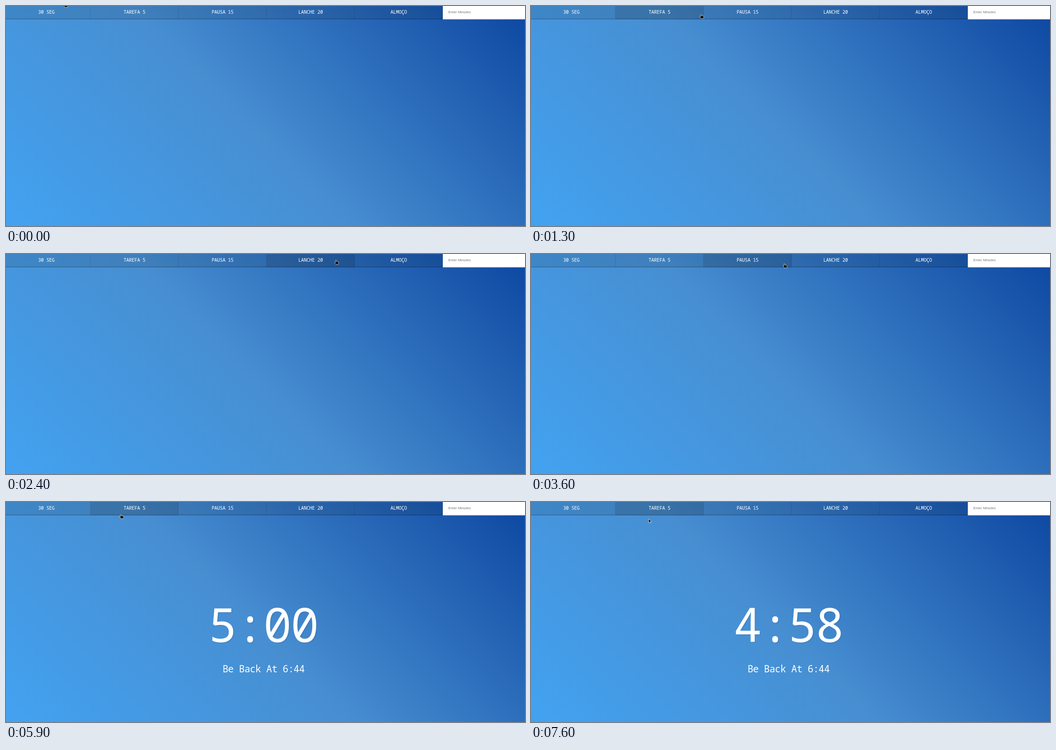
These frames come from a looping animation (1149 by 487 pixels, 8 s). An HTML page:

```html
<!DOCTYPE html>
<html lang="pt">
<head>
<meta charset="utf-8">
<title>Countdown timer</title>
<style>
html, body { margin: 0; width: 100%; height: 100%; overflow: hidden; }
svg {
  display: block; width: 1149px; height: 487px;
  background: linear-gradient(45deg, #42a5f5 0%, #478ed1 50%, #0d47a1 100%) -8px 0 / 1157px 583px no-repeat;
}
text { fill: #fff; font-family: "Noto Sans Mono", "DejaVu Sans Mono", monospace; letter-spacing: -.0238em; white-space: pre; }
.label { font-size: 10.5px; text-anchor: middle; }
.time { font-size: 105px; text-shadow: 2.4px 2.4px 0 rgba(0, 0, 0, .05); }
.back { font-size: 21px; }
.hint { font: 8.05px "Liberation Sans", Arial, sans-serif; letter-spacing: 0; fill: #757575; }
#cursor path { stroke: #fff; stroke-width: .7; stroke-linejoin: round; }
</style>
</head>
<body>
<svg viewBox="0 0 1149 487">
  <g id="bar"></g>
  <rect x="967" width="182" height="29.5" fill="#fff"/>
  <text class="hint" x="979.2" y="15.8">Enter Minutes</text>
  <g id="display">
    <text id="time" class="time" x="448.5" y="309.5"></text>
    <text class="back" x="479.5" y="376.7">Be Back At 6:44</text>
  </g>
  <g id="cursor">
    <path id="hand" d="M-.6 .9Q.5-.2 1.4 .9V3.4L5.4 4.2Q6.6 4.6 6.5 6L5.8 9.8H.6L-2.2 6.4Q-2.9 5-1.7 4.9L-.6 5.6Z"/>
    <path id="arrow" d="M.4 .4V9L2.5 7.1 4 10.2 5.3 9.6 3.9 6.6H6.8Z"/>
  </g>
</svg>
<script>
const LOOP = 8000, STEP = 100, START = 5400;
const CELL = 195, LEFT = -8, TOP = -6, BAR = 29.5;
const labels = ['30 SEG', 'TAREFA 5', 'PAUSA 15', 'LANCHE 20', 'ALMOÇO'];
const $ = id => document.getElementById(id);

// Cursor moves: start, end, destination; it rests in between
const origin = [130, -7];
const moves = [
  [0, 1300, 376, 18],
  [1300, 2400, 730, 13],
  [3500, 3600, 560.5, 21],
  [3600, 4800, 219.5, 19],
  [5500, 5900, 254, 27],
  [6300, 7600, 260, 37]
];

// Each button: fill with a darker bottom and right border
$('bar').innerHTML = labels.map((label, i) => {
  const x = LEFT + CELL * i;
  return `<rect class="button" x="${x}" width="${CELL}" height="${BAR}"/>
    <path fill-opacity=".2" d="M${x} ${BAR}v-1.8h${CELL - .6}V0h.6V${BAR}z"/>
    <text class="label" x="${x + CELL / 2 - .1}" y="16.7">${label}</text>`;
}).join('');
const buttons = document.querySelectorAll('.button');

function cursorAt(t) {
  return moves.reduce(([x, y], [start, end, toX, toY]) => {
    const k = Math.min(1, Math.max(0, (t - start) / (end - start)));
    return [x + (toX - x) * k, y + (toY - y) * k];
  }, origin);
}

const show = (id, on) => $(id).style.display = on ? '' : 'none';

function draw(t) {
  const [x, y] = cursorAt(Math.floor(t / STEP) * STEP);
  const running = t >= START, over = y < BAR;
  const active = running ? 1 : y < TOP ? -1 : Math.floor((x - LEFT) / CELL);
  buttons.forEach((b, i) => b.setAttribute('fill-opacity', i === active ? .2 : .1));

  $('cursor').setAttribute('transform', `translate(${x} ${y})`);
  show('hand', over);
  show('arrow', !over);

  show('display', running);
  const left = 300 - Math.floor((t - START) / 1000);
  $('time').textContent = Math.floor(left / 60) + ':' + String(left % 60).padStart(2, '0');
}

const begin = performance.now();
function frame() {
  draw((performance.now() - begin) % LOOP);
  requestAnimationFrame(frame);
}
frame();
</script>
</body>
</html>
```
